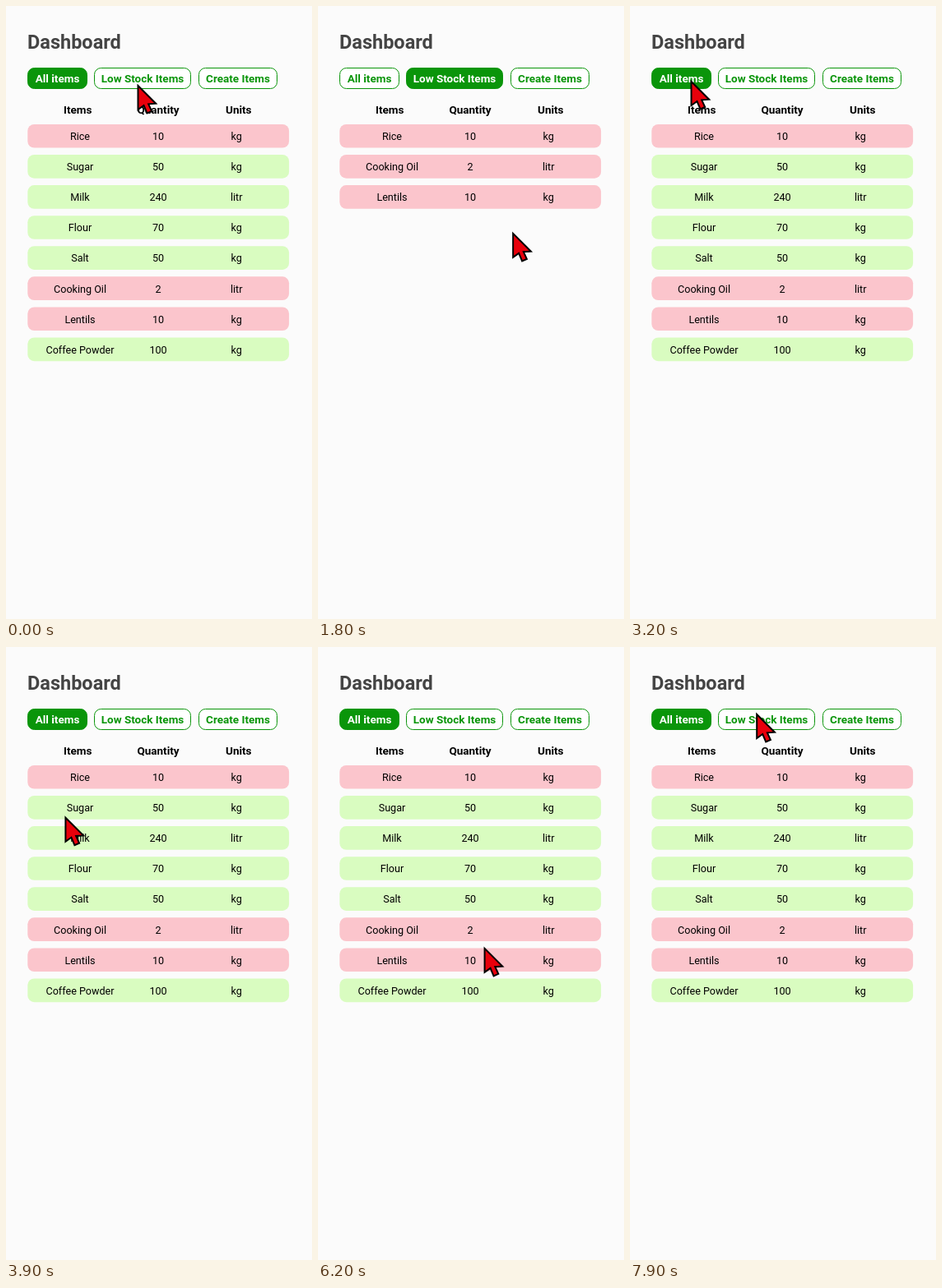
Write an HTML page that moves like this. It is 372 px wide and 746 px high and loops after 8 s.

```html
<!DOCTYPE html>
<html lang="en">
<head>
<meta charset="utf-8">
<title>Dashboard</title>
<style>
  html, body { margin: 0; width: 100%; height: 100%; overflow: hidden; background: #fbfbfb; }
  svg { display: block; font-family: Roboto, sans-serif; font-size: 12.6px; }
  text { text-anchor: middle; }
  .title { font-size: 23.5px; font-weight: 700; fill: #444; text-anchor: start; }
  .bold { font-size: 13.5px; font-weight: 700; }
  .btn rect { fill: #fff; stroke: #0a950a; }
  .btn text { fill: #0a950a; }
  .btn.on rect { fill: #0a950a; }
  .btn.on text { fill: #fff; }
</style>
</head>
<body>
<svg width="372" height="746" viewBox="0 0 372 746">
  <text class="title" x="26" y="52">Dashboard</text>
  <g id="buttons"></g>
  <g id="heads"></g>
  <g id="rows"></g>
  <path id="cursor" d="M.5 3V32L7.5 27 11.5 36.5 17.2 34 13.2 25.3 22.2 24.7Z"
        fill="#e8000b" stroke="#000" stroke-width="2"/>
</svg>
<script>
const $ = id => document.getElementById(id);
const LOOP = 8000, LOW_AT = 700, ALL_AT = 3200;

const text = (x, y, s, cls = "") => `<text class="${cls}" x="${x}" y="${y}">${s}</text>`;

const buttons = [["All items", 26.5, 72], ["Low Stock Items", 107.5, 117], ["Create Items", 234.5, 95]];
$("buttons").innerHTML = buttons.map(([label, x, w]) =>
  `<g class="btn"><rect x="${x}" y="75.5" width="${w}" height="25" rx="8"/>` +
  text(x + w / 2, 93, label, "bold") + "</g>").join("");

$("heads").innerHTML = ["Items", "Quantity", "Units"]
  .map((s, i) => text(87.2 + i * 97.8, 131.4, s, "bold")).join("");

const items = [
  ["Rice", 10, "kg"], ["Sugar", 50, "kg"], ["Milk", 240, "litr"], ["Flour", 70, "kg"],
  ["Salt", 50, "kg"], ["Cooking Oil", 2, "litr"], ["Lentils", 10, "kg"], ["Coffee Powder", 100, "kg"]
];
const isLow = item => item[1] <= 10;

function row(item, i) {
  const y = 143.9 + i * 37.08;
  return `<rect x="26.3" y="${y}" width="317.8" height="28.7" rx="8" fill="${isLow(item) ? "#fbc5cc" : "#d9fcc0"}"/>` +
    item.map((s, col) => text(90 + col * 95.1, y + 19.2, s)).join("");
}

let shown;
function show(low) {
  if (shown === low) return;
  shown = low;
  $("rows").innerHTML = (low ? items.filter(isLow) : items).map(row).join("");
  [...$("buttons").children].forEach((b, i) => b.classList.toggle("on", i === +low));
}

// Pointer stops: arrival time, x, y, and how long it rests there
const stops = [
  { t: 0, x: 160, y: 94 },
  { t: 1100, x: 116.5, y: 84 },
  { t: 1650, x: 250, y: 290 },
  { t: 2500, x: 90, y: 97 },
  { t: 2900, x: 74, y: 89, rest: 300 },
  { t: 3700, x: 95, y: 315 },
  { t: 4000, x: 64, y: 167, rest: 200 },
  { t: 5250, x: 310, y: 159 },
  { t: 5950, x: 46, y: 383 },
  { t: 6340, x: 266, y: 356 },
  { t: 6900, x: 268, y: 368 },
  { t: 7800, x: 153.7, y: 79 }
];

function pointAt(t) {
  const i = stops.findLastIndex(s => s.t <= t);
  const a = stops[i], b = stops[i + 1] || a, start = a.t + (a.rest || 0);
  const u = b === a ? 0 : Math.max(0, (t - start) / (b.t - start));
  const k = u * u * (3 - 2 * u);
  return [a.x + (b.x - a.x) * k, a.y + (b.y - a.y) * k];
}

function draw() {
  const t = performance.now() % LOOP;
  show(t >= LOW_AT && t < ALL_AT);
  $("cursor").setAttribute("transform", `translate(${pointAt(t)})`);
  requestAnimationFrame(draw);
}
draw();
</script>
</body>
</html>
```
